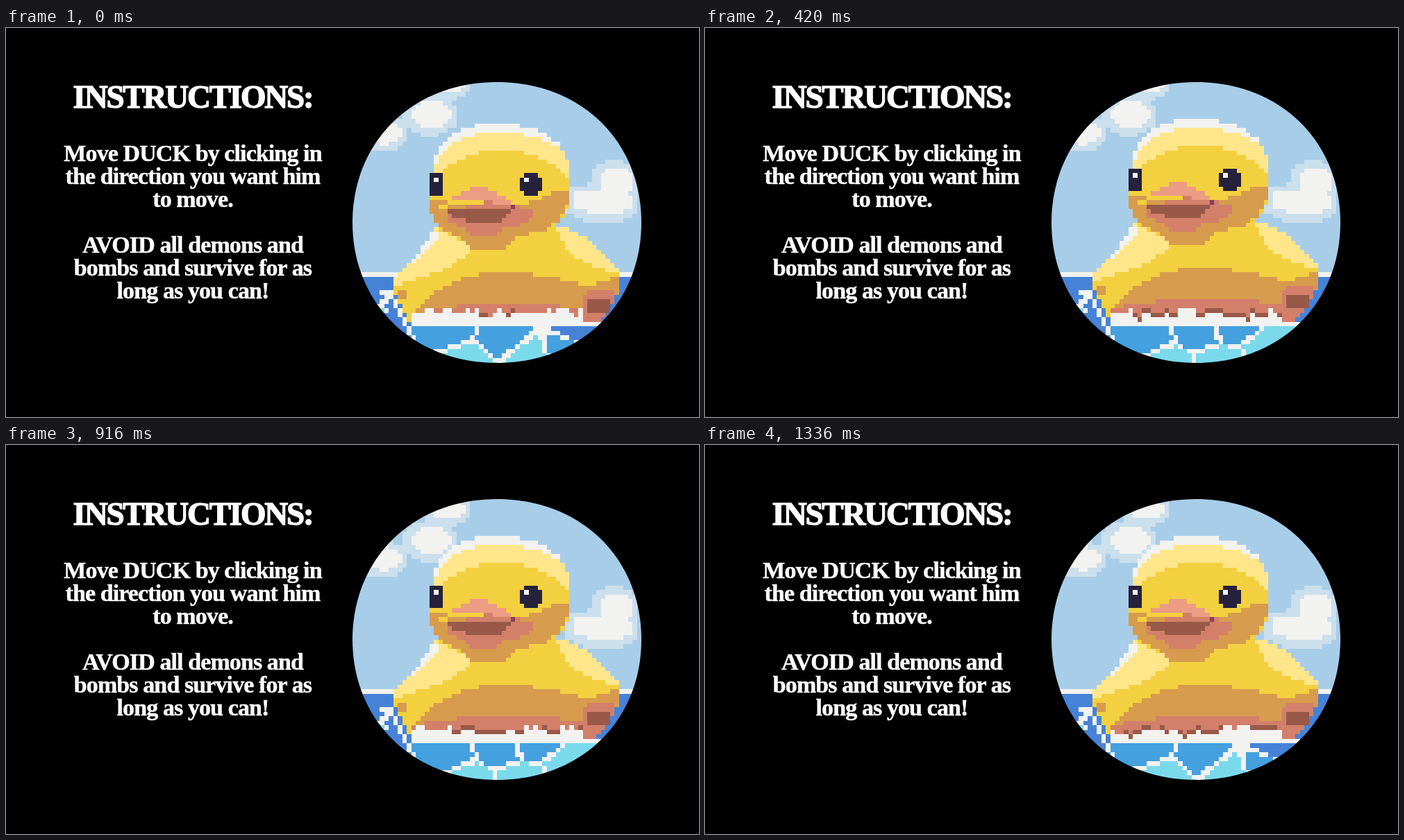
Write an HTML page with a canvas that moves like this. It is 998x561 px and loops after 1.42 s.

```html
<!DOCTYPE html>
<html lang="en">
<head>
<meta charset="utf-8">
<title>Instructions</title>
<style>
  html, body { margin: 0; width: 100%; height: 100%; overflow: hidden; background: #000; }
  canvas, svg { position: absolute; left: 0; top: 0; display: block; }
  canvas {
    clip-path: path('M499 280.5 C499 163 586.4 78 707 78 S915 163 915 280.5 827.6 483 707 483 499 398 499 280.5Z');
  }
  text {
    font: bold 34px "Liberation Serif", "Noto Serif", serif; letter-spacing: -.9px;
    fill: #fff; stroke: #fff; stroke-width: .5px; text-anchor: middle;
  }
  .title { font-size: 47px; letter-spacing: -2.2px; stroke-width: 1.4px; }
</style>
</head>
<body>
<canvas id="stage" width="998" height="561"></canvas>
<svg width="998" height="561">
  <text class="title" x="269" y="115">INSTRUCTIONS:</text>
  <text x="269" y="192">Move DUCK by clicking in</text>
  <text x="269" y="225">the direction you want him</text>
  <text x="269" y="258">to move.</text>
  <text x="269" y="324">AVOID all demons and</text>
  <text x="269" y="357">bombs and survive for as</text>
  <text x="269" y="390">long as you can!</text>
</svg>
<script>
const SIZE = 64, CELL = 6.5, LEFT = 499, TOP = 72.5, LOOP = 1420, STEP = 210;
const HORIZON = 43, WATERLINE = 55;
const C = {
  sky: '#a8cde8', mist: '#cbdfec', white: '#f2f2f0', deep: '#4683d7', blue: '#45a0df',
  cyan: '#7adaec', yellow: '#f3d03f', pale: '#ffe68b', tan: '#d79b4d', salmon: '#d37f6a',
  pink: '#ec9c83', brown: '#985948', ink: '#26213c', plum: '#8b3f58'
};

// rows the head rises in each step; everything else follows from it
const BOB = [0, 2, 1, 0, 1, 2, 1];

// puffs: centre and radii in cells
const CLOUDS = [
  [17.5, 8, 4.6, 3], [7, 12, 4, 2.6], [21, 1, 4, 2],
  [58.5, 23, 3.6, 3.4], [56, 27.5, 6, 3], [51, 27, 2.4, 2]
];

// centres of the patches between the ripples, for both states of the sea
const PATCHES = [
  [['blue', 20, 56], ['blue', 33, 57], ['blue', 46, 60], ['cyan', 24, 62], ['cyan', 39, 61], ['deep', 50, 55]],
  [['blue', 20, 57], ['blue', 33, 56], ['blue', 39, 55], ['cyan', 25, 63], ['cyan', 37, 62], ['cyan', 47, 60]]
];

const noise = (a, b) => {
  const n = Math.sin(a * 127.1 + b * 311.7) * 43758.5453;
  return n - Math.floor(n);
};

function makePen() {
  const art = document.createElement('canvas');
  art.width = art.height = SIZE;
  const g = art.getContext('2d');
  let dy = 0;
  const box = (color, x, y, w = 1, h = 1) => {
    g.fillStyle = C[color];
    g.fillRect(x, y + dy, w, h);
  };
  const fill = (color, d) => {
    const path = new Path2D(d);
    for (let y = 0; y < SIZE; y++)
      for (let x = 0; x < SIZE; x++)
        if (g.isPointInPath(path, x + .5, y + .5)) box(color, x, y);
  };
  const oval = (color, cx, cy, rx, ry) => {
    for (let y = Math.floor(cy - ry); y < cy + ry; y++)
      for (let x = Math.floor(cx - rx); x < cx + rx; x++)
        if (Math.hypot((x + .5 - cx) / rx, (y + .5 - cy) / ry) < 1) box(color, x, y);
  };
  return { art, box, fill, oval, shift: v => { dy = v; } };
}

function drawSky(p, drop) {
  p.box('sky', 0, 0, SIZE, HORIZON);
  p.shift(drop);
  for (const [x, y, rx, ry] of CLOUDS) p.oval('mist', x - .5, y + .2, rx + 1.8, ry + 1.6);
  for (const puff of CLOUDS) p.oval('white', ...puff);
  p.shift(0);
  p.box('white', 0, HORIZON, SIZE, 1);
  p.box('deep', 0, HORIZON + 1, SIZE, SIZE);
}

function drawBody(p, dy) {
  p.shift(dy);
  p.fill('yellow', 'M18 33H47Q54 36 59 43V47L53 55H13L9 47V44Q17 37 18 33Z');
  p.fill('pale', 'M18 33Q25 36 26 38 24 42 9 46V44Q17 37 18 33Z');
  p.fill('white', 'M18 33L19 35Q16 39 9 44Q17 37 18 33Z');
  p.fill('pale', 'M45 33H47Q54 36 59 43 48 42 45 33Z');
  p.fill('tan', 'M13 52Q20 45 28 43.4T52 46L59 44V47L53 54Z');
  p.fill('salmon', 'M13 55V52Q31 48.5 51 51V48L53 47H58Q58 53 53 55Z');
  p.oval('brown', 54.5, 50.5, 2.6, 1.7);
  p.box('tan', 10, 47, 2, 2);
  p.shift(0);
}

function drawHead(p, dy) {
  p.shift(dy);
  p.fill('white', 'M18 21C18 13 24 10 32 10S48 13 48 21V24H18Z');
  p.fill('pale', 'M18 21C18.5 15 24 12 32 12S48 14 48 21V24H18Z');
  p.fill('yellow', 'M17 21L19 22C22 18 27 16 33 16S44 18 48 22C49 31 45 34 37 35H26C19 33 17 30 17 21Z');
  p.fill('tan', 'M48 25H45Q40 28 33 29L17 27Q17 33 25 36L27 38H33L36 35Q48 34 48 25Z');
  p.fill('salmon', 'M20 31Q27 26 36 28L41 30Q38 33 33 33 31 36 27 35 24 33 20 31Z');
  p.fill('yellow', 'M19 28.6Q23 26 29 28Z');
  p.fill('pink', 'M21 27.5Q25 24 29 24.3 33 25 36 29 28 26 21 27.5Z');
  p.fill('brown', 'M21 29.5Q27 28.5 35 29 34 32 29 32.2 24 32 21 29.5Z');
  p.box('plum', 35, 28);
  for (const [x, r] of [[39.5, 2.7], [18.5, 1.9]]) p.oval('ink', x, 23.5, r, 2.7);
  for (const x of [38, 18]) p.box('white', x, 22);
  p.shift(0);
}

function drawSea(p, patches) {
  for (let y = WATERLINE; y < SIZE; y++)
    for (let x = 12; x < 55; x++) {
      const [a, b] = patches
        .map(([color, px, py]) => ({ color, d: Math.hypot(x - px, (y - py) * 1.4) }))
        .sort((m, n) => m.d - n.d);
      p.box(b.d - a.d < 1 ? 'white' : a.color, x, y);
    }
}

function drawFoam(p, brown, seed) {
  for (let x = 13; x < 55; x++) {
    const top = x < 51 ? 51 + Math.floor(noise(x >> 1, seed) * 1.4 + noise(x, seed)) : 54;
    p.box('white', x, top, 1, WATERLINE - top);
    if (x > 15 && x < 51 && noise(x >> 1, seed + 3) < brown) p.box('brown', x, top);
  }
  // spray on the left
  for (let y = 47; y < 58; y++) {
    const x = 8 + (y - 47) / 2;
    p.box('white', Math.floor(x), y);
    if (y < 52) p.box('white', Math.floor(x - 1 - noise(y, 2) * 4), y, 1 + Math.round(noise(y, 5)), 1);
  }
  p.box('cyan', 4, 51, 3, 1);
}

function render(bob, i) {
  const p = makePen();
  drawSky(p, i > 3 ? 2 : 0);
  drawBody(p, -Math.min(bob, 1));
  drawHead(p, -bob);
  drawSea(p, PATCHES[i > 0 && i < 5 ? 1 : 0]);
  drawFoam(p, .15 + bob * .4, i);
  return p.art;
}

const arts = BOB.map(render);
const ctx = document.getElementById('stage').getContext('2d');
ctx.imageSmoothingEnabled = false;

// the third step is 50 ms shorter than the others
const stepAt = t => Math.floor((t < 2 * STEP ? t : t + 50) / STEP);

function tick() {
  const art = arts[stepAt(performance.now() % LOOP)];
  ctx.drawImage(art, LEFT, TOP, SIZE * CELL, SIZE * CELL);
  requestAnimationFrame(tick);
}
tick();
</script>
</body>
</html>
```
